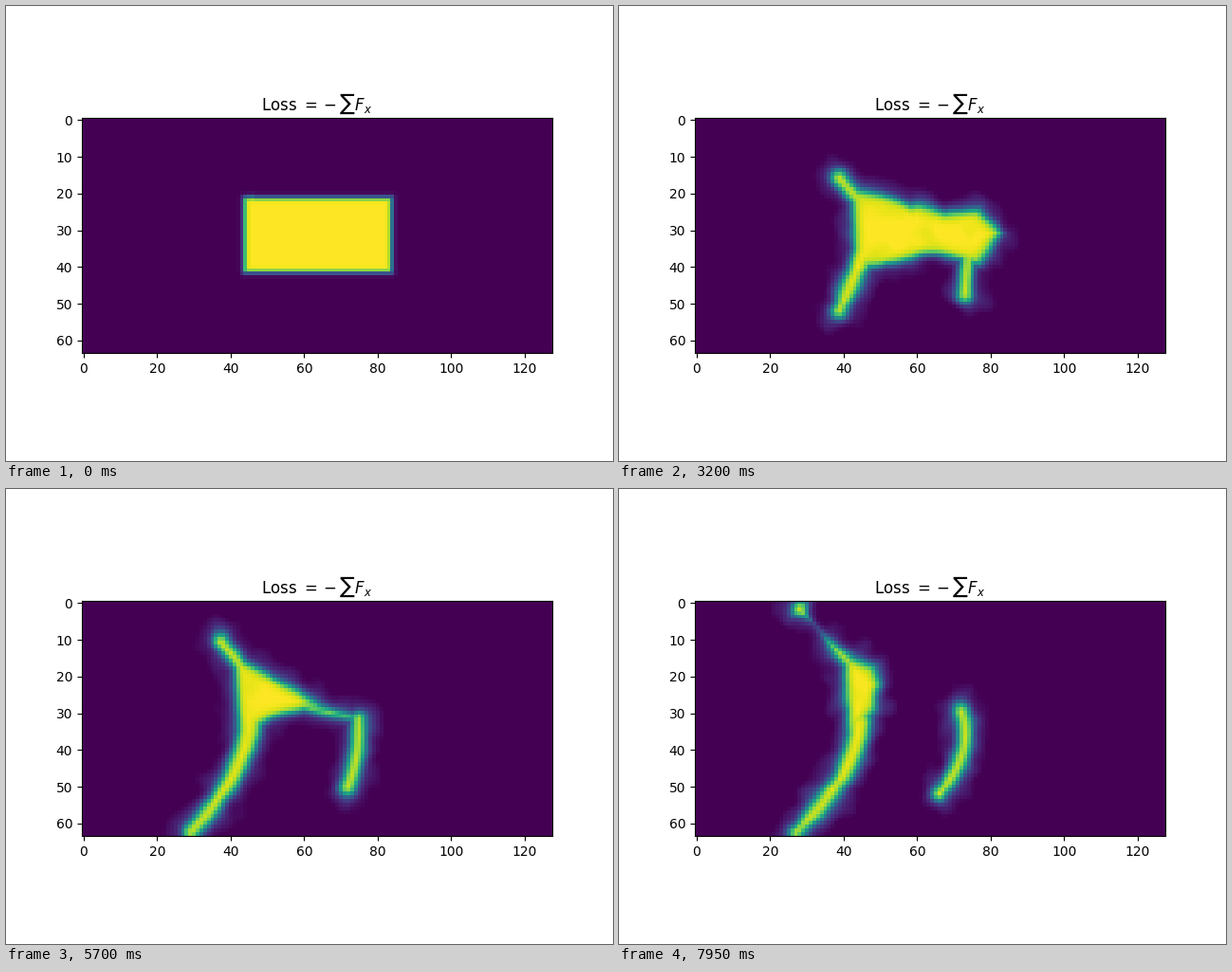
These frames come from a looping animation (640x480 px, 8 s). A matplotlib script:

```python
import numpy as np
import matplotlib.pyplot as plt
from matplotlib.animation import FuncAnimation

FRAMES, STEP = 160, 50
ROWS, COLS = 64, 128
STAGES = (0, 3200, 5400, 7950)  # ms: block, hollowed body, thin limbs, split
Y, X = np.mgrid[0:ROWS, 0:COLS].astype(float)


def rough_field(rng):
    """Blotchy random field with zero mean and unit spread."""
    f = rng.standard_normal((ROWS, COLS))
    for _ in range(3):
        for axis in (0, 1):
            f = (np.roll(f, 1, axis) + f + np.roll(f, -1, axis)) / 3
    return f / f.std()


rng = np.random.default_rng(4)
fields = [rough_field(rng) for _ in range(9)]


def noise(i):
    n, p = i // 20, i % 20 / 20
    return fields[n] * (1 - p) + fields[n + 1] * p


def mover(ms):
    """Return a function that moves a value through the four stages."""
    k = 2 if ms >= STAGES[2] else 1 if ms >= STAGES[1] else 0
    p = (ms - STAGES[k]) / (STAGES[k + 1] - STAGES[k])

    def move(*values, late=1):
        q = (1 - (1 - p) ** 2, p, p ** late)[k]
        a, b = np.array(values[k], float), np.array(values[k + 1], float)
        return a + (b - a) * q

    return move


def project(a, b):
    """Distance to segment ab and position along it."""
    dx, dy = b[0] - a[0], b[1] - a[1]
    t = ((X - a[0]) * dx + (Y - a[1]) * dy) / (dx * dx + dy * dy + 1e-9)
    t = np.clip(t, 0, 1)
    return np.hypot(X - a[0] - t * dx, Y - a[1] - t * dy), t


def outline(pts):
    """Signed distance, positive inside the polygon."""
    dist = np.full(X.shape, 1e9)
    inside = np.zeros(X.shape, bool)
    for a, b in zip(pts, pts[1:] + pts[:1]):
        dist = np.minimum(dist, project(a, b)[0])
        if a[1] != b[1]:
            cross = a[0] + (Y - a[1]) * (b[0] - a[0]) / (b[1] - a[1])
            inside ^= ((a[1] > Y) != (b[1] > Y)) & (X < cross)
    return np.where(inside, dist, -dist)


def limb(a, mid, b, ra, rb, gap=0, parts=8):
    """Tapered curve from a through mid to b, thinned by gap near its end."""
    ctrl = 2 * mid - (a + b) / 2
    u = np.linspace(0, 1, parts + 1)[:, None]
    path = (1 - u) ** 2 * a + 2 * u * (1 - u) * ctrl + u ** 2 * b
    radius = (ra + (rb - ra) * u - gap * np.sin(np.pi * u ** 2))[:, 0]
    depth = np.full(X.shape, -1e9)
    for j in range(parts):
        d, t = project(path[j], path[j + 1])
        depth = np.maximum(depth, radius[j] + t * (radius[j + 1] - radius[j]) - d)
    return depth


def body(ms, move, top, low):
    corners = [top,
               move((83.8, 21.4), (77, 24.5), (60, 25.2), (48, 17.8)),
               move((83.8, 31.5), (83, 31), (66, 29), (49.8, 22.5)),
               move((83.8, 41.6), (77, 39.5), (51, 32), (48.3, 29)),
               low]
    ripple = 0.8 * np.sin(np.pi * min(ms / STAGES[1], 1))
    waist = move(0, 3, 0, 0) * np.exp(-((X - 64) / 9) ** 2)
    return outline(corners) + ripple * np.cos(2 * np.pi * (X - 57) / 17) - waist


def shape_depth(ms):
    move = mover(ms)
    top = move((43.7, 21.4), (42.4, 19.3), (40.8, 14.5), (39.8, 14.3))
    low = move((43.7, 41.6), (43, 40), (42.5, 37), (41.3, 38))

    root = top + (2.5, 3.5)
    tip = move((45.6, 23), (38.8, 16.2), (37.5, 11), (28.2, 2), late=2)
    gap = move(0, 0, 0, 2.6, late=4)

    hip = low + (3, -5)
    heel = move((48, 36), (42.3, 44), (41, 46.5), (39.6, 47))
    foot = move((47, 38), (38.7, 52), (29.5, 62.5), (27, 62.5))

    elbow = move((75, 31), (74, 33), (75, 32), (72, 29.8))
    hand = move((75, 30), (73, 47.5), (72.6, 50), (66, 52))
    bow = (move(0, 0, 0.8, 3.4), 0)

    chest = np.array((60, 28.5))
    arm = move(3, 5, 1.9, -7)
    return np.maximum.reduce([
        body(ms, move, top, low),
        limb(root, (root + tip) / 2, tip, 1.7, 1.8, gap),
        limb(hip, heel, foot, 2.9, 1.7),
        limb(elbow, (elbow + hand) / 2 + bow, hand, 1.7, 1.7),
        limb(chest, (chest + elbow) / 2, elbow, arm, arm, parts=1),
    ])


def density(i):
    ms = i * STEP
    n, soft = noise(i), min(ms / 700, 1)
    depth = shape_depth(ms)
    core = 1 / (1 + np.exp(-(2.6 - 1.2 * soft) * (depth + 0.15 * soft * n)))
    halo = np.clip(1 + (depth + 1.1 * soft * n) / (1.5 + 3.5 * soft), 0, 1)
    share = 0.13 * soft
    grain = 1 - 0.02 * soft * np.clip(n + 0.5, 0, 2)
    return ((1 - share) * core + share * halo) * grain


fig, ax = plt.subplots(figsize=(6.4, 4.8), dpi=100)
image = ax.imshow(density(0), vmin=0, vmax=1, cmap="viridis")
ax.set_title(r"Loss $= -\sum F_x$")


def draw(i):
    image.set_data(density(i))
    return [image]


anim = FuncAnimation(fig, draw, frames=FRAMES, interval=STEP,
                     repeat=True, repeat_delay=0)
plt.show()
```
